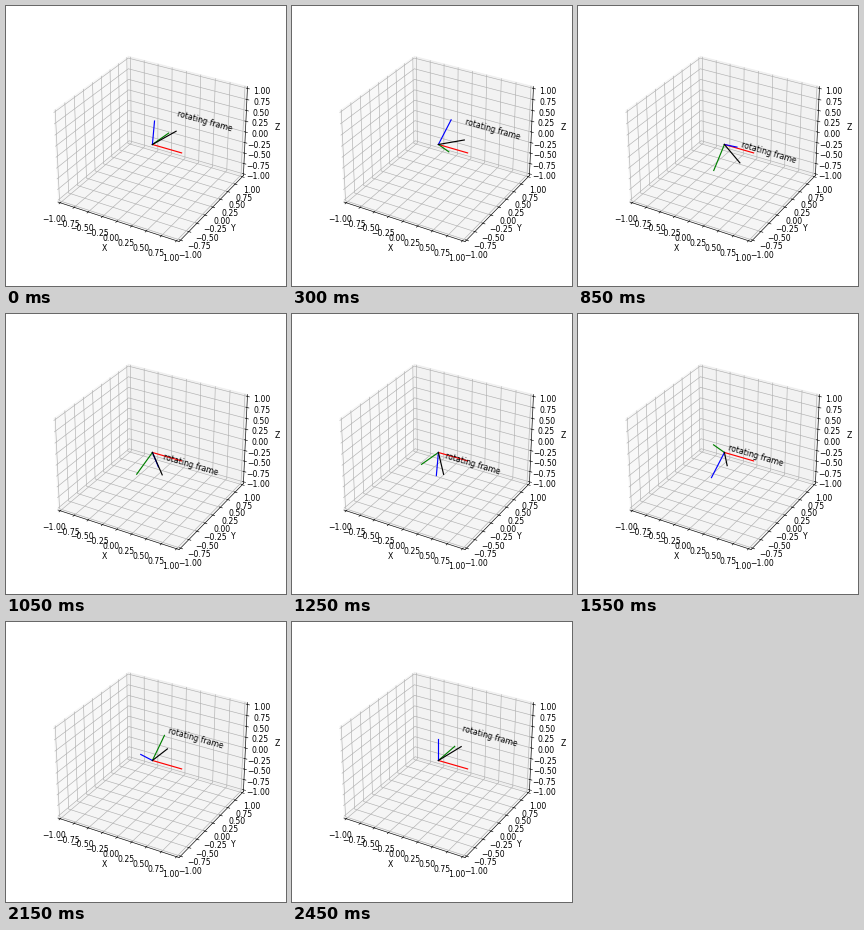
Recreate the animation shown at these times as a matplotlib script. Size 280x280 px, loop 2.5 s.

```python
import numpy as np
import matplotlib.pyplot as plt
from matplotlib.animation import FuncAnimation

FRAMES = 50
INTERVAL = 50
SIZE = 0.5
MARGIN = 1 / 48

fig = plt.figure(figsize=(5, 5), dpi=56)
ax = fig.add_subplot(projection="3d")
ax.set_xlim(-1, 1, view_margin=MARGIN)
ax.set_ylim(-1, 1, view_margin=MARGIN)
ax.set_zlim(-1, 1, view_margin=MARGIN)
ax.set(xlabel="X", ylabel="Y", zlabel="Z")

# three basis vectors, then the pointer to the label
lines = [ax.plot([], [], [], color=c)[0] for c in "rgbk"]
label = ax.text(0, 0, 0, "rotating frame", zdir="x")


def basis(angle):
    """Columns are the axes of a frame turned about X."""
    c, s = np.cos(angle), np.sin(angle)
    return np.array([[1, 0, 0], [0, c, s], [0, -s, c]])


def update(step):
    axes = SIZE * basis(2 * np.pi * (step + 1) / FRAMES).T
    anchor = axes.sum(axis=0) / 2
    for line, tip in zip(lines, [*axes, anchor]):
        line.set_data_3d(*([0, v] for v in tip))
    label.set_position_3d(anchor, zdir="x")
    return [*lines, label]


anim = FuncAnimation(fig, update, frames=FRAMES, interval=INTERVAL,
                     repeat=True, repeat_delay=0, blit=False)
plt.show()
```
